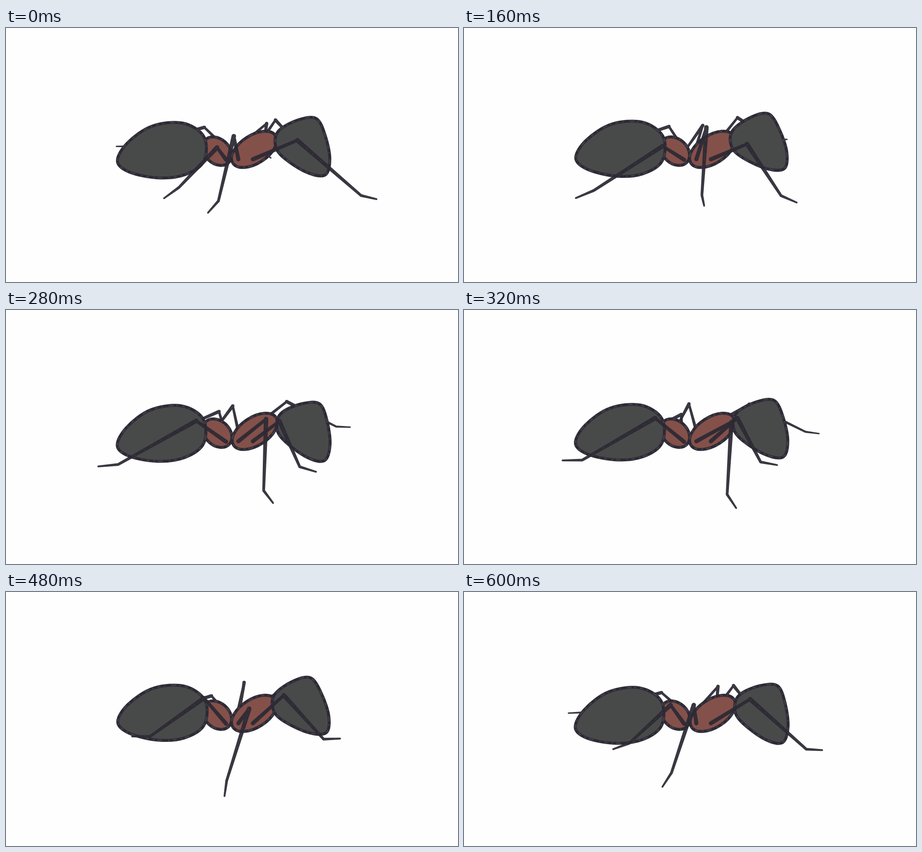
An HTML page with a canvas for the animation above (0.64 s loop, 998 px wide and 561 px high).

```html
<!DOCTYPE html>
<html lang="en">
<head>
<meta charset="utf-8">
<title>Walking ant</title>
<style>
html, body { margin: 0; width: 100%; height: 100%; overflow: hidden; background: #fefefe; }
canvas { display: block; }
</style>
</head>
<body>
<canvas id="stage" width="998" height="561"></canvas>
<script>
const ctx = document.getElementById('stage').getContext('2d');
const STEP = 40, STEPS = 16, STANCE = 6;
const INK = '#2d2a35', LIGHT = '#4b4951', GREY = '#484a4a', RED = '#84504a';

// Each joint slides from front to back on the ground, then swings forward
// along an arc pushed out by lift. Sway shifts the swing sideways.
const joint = (front, back, lift, sway = 0) => ({ front, back, lift, sway });
const legs = [
  { hip: [486, 291], bow: [3, 1], joints: [
      joint([466, 264], [421, 258], [-11, -28]),
      joint([382, 352], [235, 361], [-5, -38]),
      joint([349, 376], [192, 374], [-8, -58])],
    far: { hip: [481, 261], scale: [0.95, 0.45], move: [37, 112] } },
  { hip: [513, 290], bow: [8, -14], joints: [
      joint([503, 239], [541, 228], [38, 24], 31),
      joint([469, 382], [543, 381], [15, 36], 44),
      joint([446, 408], [562, 403], [20, 46], 50)],
    far: { hip: [512, 264], scale: [0.9, 0.4], move: [44, 112] } },
  { hip: [545, 290], bow: [6, 1], joints: [
      joint([643, 248], [608, 259], [-16, -25]),
      joint([784, 370], [650, 369], [-30, -46]),
      joint([818, 378], [685, 388], [-28, -60])],
    far: { hip: [568, 243], scale: [0.88, 0.5], move: [64, 84] } }
];

const mix = (a, b, u) => a + (b - a) * u;

function jointAt({ front, back, lift, sway }, bow, k) {
  if (k < STANCE) {
    const u = k / STANCE, arc = Math.sin(Math.PI * u);
    return [0, 1].map(i => mix(front[i], back[i], u) + bow[i] * arc);
  }
  const u = (k - STANCE) / (STEPS - STANCE);
  const arc = Math.sin(Math.PI * u) ** 0.6;
  const [x, y] = [0, 1].map(i => mix(back[i], front[i], u) + lift[i] * arc);
  return [x + sway * Math.sin(2 * Math.PI * u), y];
}

const nearPose = (leg, k) =>
  [leg.hip, ...leg.joints.map(j => jointAt(j, leg.bow, k))];

// The far legs walk half a cycle later, flattened by perspective
function farPose(leg, k) {
  const { hip, scale, move } = leg.far;
  const [, ...rest] = nearPose(leg, (k + STEPS / 2) % STEPS);
  return [hip, ...rest.map(p => p.map((v, i) => v * scale[i] + move[i]))];
}

function taper(path, [ax, ay], [bx, by], wa, wb) {
  const d = Math.hypot(bx - ax, by - ay) || 1;
  const nx = (by - ay) / d / 2, ny = (ax - bx) / d / 2;
  path.moveTo(ax + nx * wa, ay + ny * wa);
  path.lineTo(bx + nx * wb, by + ny * wb);
  path.lineTo(bx - nx * wb, by - ny * wb);
  path.lineTo(ax - nx * wa, ay - ny * wa);
  path.closePath();
  for (const [x, y, w] of [[ax, ay, wa], [bx, by, wb]]) {
    path.moveTo(x + w / 2, y);
    path.arc(x, y, w / 2, 0, 7);
  }
}

function streaks(path, width, alpha, dash) {
  ctx.globalAlpha = alpha;
  ctx.strokeStyle = LIGHT;
  ctx.lineWidth = width;
  ctx.setLineDash(dash);
  ctx.stroke(path);
  ctx.setLineDash([]);
  ctx.globalAlpha = 1;
}

function drawLeg([hip, knee, ankle, toe], size) {
  const shape = new Path2D(), core = new Path2D();
  taper(shape, hip, knee, 9 * size, 7 * size);
  taper(shape, knee, ankle, 10 * size, 6 * size);
  taper(shape, ankle, toe, 6 * size, 4 * size);
  ctx.globalAlpha = 0.94;
  ctx.fillStyle = INK;
  ctx.fill(shape);
  core.moveTo(...knee);
  core.lineTo(...ankle);
  core.lineTo(...toe);
  streaks(core, 2, 0.3, [5, 9, 3, 6, 8, 12]);
}

// Smooth closed curve through a few points
function blob(...pts) {
  const n = pts.length, path = new Path2D();
  const at = i => pts[(i + n) % n];
  path.moveTo(...at(0));
  for (let i = 0; i < n; i++) {
    const [a, b, c, d] = [at(i - 1), at(i), at(i + 1), at(i + 2)];
    path.bezierCurveTo(b[0] + (c[0] - a[0]) / 6, b[1] + (c[1] - a[1]) / 6,
      c[0] - (d[0] - b[0]) / 6, c[1] - (d[1] - b[1]) / 6, c[0], c[1]);
  }
  path.closePath();
  return path;
}

function oval(...spec) {
  const path = new Path2D();
  path.ellipse(...spec, 0, 2 * Math.PI);
  return path;
}

const abdomen = blob([246, 294], [268, 254], [322, 217], [390, 210], [437, 240],
  [437, 294], [395, 324], [335, 331], [272, 318]);
const head = blob([594, 252], [604, 225], [645, 203], [685, 200], [705, 238],
  [715, 290], [704, 325], [660, 317], [607, 281]);
const waist = oval(466, 272, 36, 27, 0.75);
const thorax = oval(548, 268, 56, 31, -0.574);

function drawPart(path, color, shift, angle = 0, px = 0, py = 0) {
  ctx.save();
  ctx.translate(px + shift, py);
  ctx.rotate(angle);
  ctx.translate(-px, -py);
  ctx.fillStyle = color;
  ctx.fill(path);
  ctx.strokeStyle = INK;
  ctx.lineWidth = 6.5;
  ctx.stroke(path);
  streaks(path, 4, 0.6, [7, 8, 3, 13, 11, 6, 4, 9]);
  ctx.restore();
}

function draw(k) {
  // The body rocks twice per walk cycle
  const c = Math.cos(k * Math.PI / 4), s = Math.sin(k * Math.PI / 4);
  ctx.fillStyle = '#fefefe';
  ctx.fillRect(0, 0, 998, 561);
  legs.forEach(leg => drawLeg(farPose(leg, k), 0.75));
  drawPart(waist, RED, -s);
  drawPart(thorax, RED, -2 * s);
  drawPart(abdomen, GREY, 0, 0.0175 - 0.0175 * c + 0.047 * s, 450, 310);
  drawPart(head, GREY, 0, -0.06 + 0.06 * c - 0.13 * s, 591, 300);
  legs.forEach(leg => drawLeg(nearPose(leg, k), 1));
}

const start = performance.now();
function tick() {
  draw(Math.floor((performance.now() - start) / STEP) % STEPS);
  requestAnimationFrame(tick);
}
tick();
</script>
</body>
</html>
```
